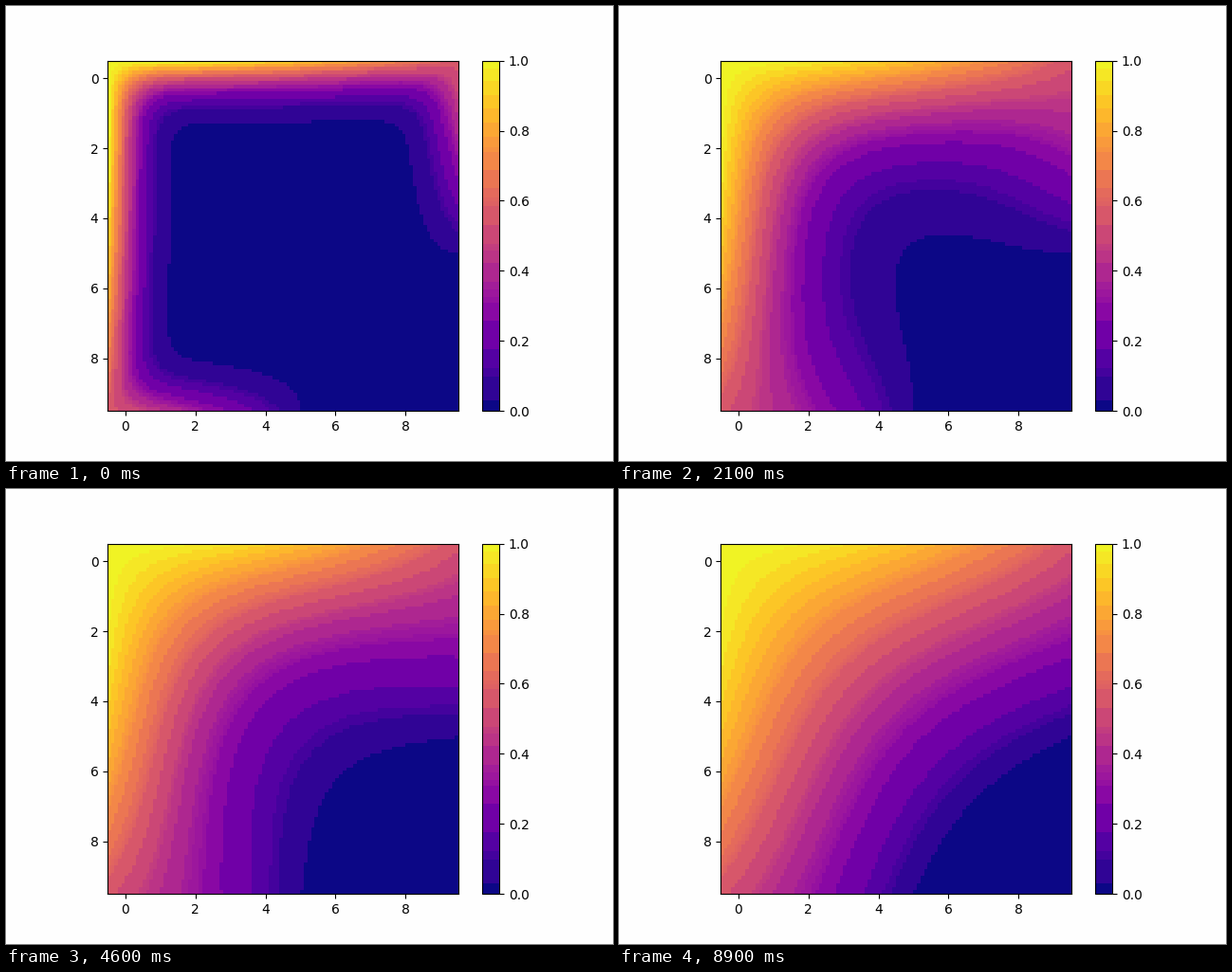
A matplotlib script that plays this animation: 640 by 480 pixels, repeating every 9 s.

```python
import numpy as np
import matplotlib.pyplot as plt
from matplotlib.animation import FuncAnimation
from matplotlib.colors import ListedColormap

N = 100           # grid cells per side
FRAMES = 90
WARMUP = 133      # relaxation sweeps before the first picture
SWEEPS = 40       # sweeps between pictures


def banded_plasma():
    """Plasma reduced to coarse RGB buckets, each shown as its mean colour."""
    rgb = plt.get_cmap("plasma")(np.arange(256), bytes=True)[:, :3].astype(int)
    keys = (rgb[:, 0] >> 5) * 256 + (rgb[:, 1] >> 4) * 16 + (rgb[:, 2] >> 5)
    out = np.empty((256, 3))
    for key in np.unique(keys):
        band = keys == key
        out[band] = np.floor(rgb[band].mean(axis=0))
    out[keys == keys[0]] = rgb[0]
    return ListedColormap(out / 255)


def relax(u, sweeps):
    """Diffuse the interior; the edges stay fixed."""
    for _ in range(sweeps):
        u[1:-1, 1:-1] = 0.25 * (u[:-2, 1:-1] + u[2:, 1:-1]
                                + u[1:-1, :-2] + u[1:-1, 2:])


def heat_history():
    x = np.arange(N) / N
    u = np.cos(x[:, None] + x[None, :])
    u[1:-1, 1:-1] = 0
    relax(u, WARMUP)
    history = [u.copy()]
    for _ in range(FRAMES - 1):
        relax(u, SWEEPS)
        history.append(u.copy())
    return history


fields = heat_history()

fig, ax = plt.subplots(figsize=(6.4, 4.8), dpi=100, facecolor="#fefefe")
im = ax.imshow(fields[0], cmap=banded_plasma(), vmin=0, vmax=1,
               extent=(-0.5, 9.5, 9.5, -0.5), interpolation="nearest")
fig.colorbar(im)


def update(i):
    im.set_data(fields[i])
    return [im]


anim = FuncAnimation(fig, update, frames=FRAMES, interval=100,
                     repeat=True, repeat_delay=0, blit=False)
plt.show()
```
